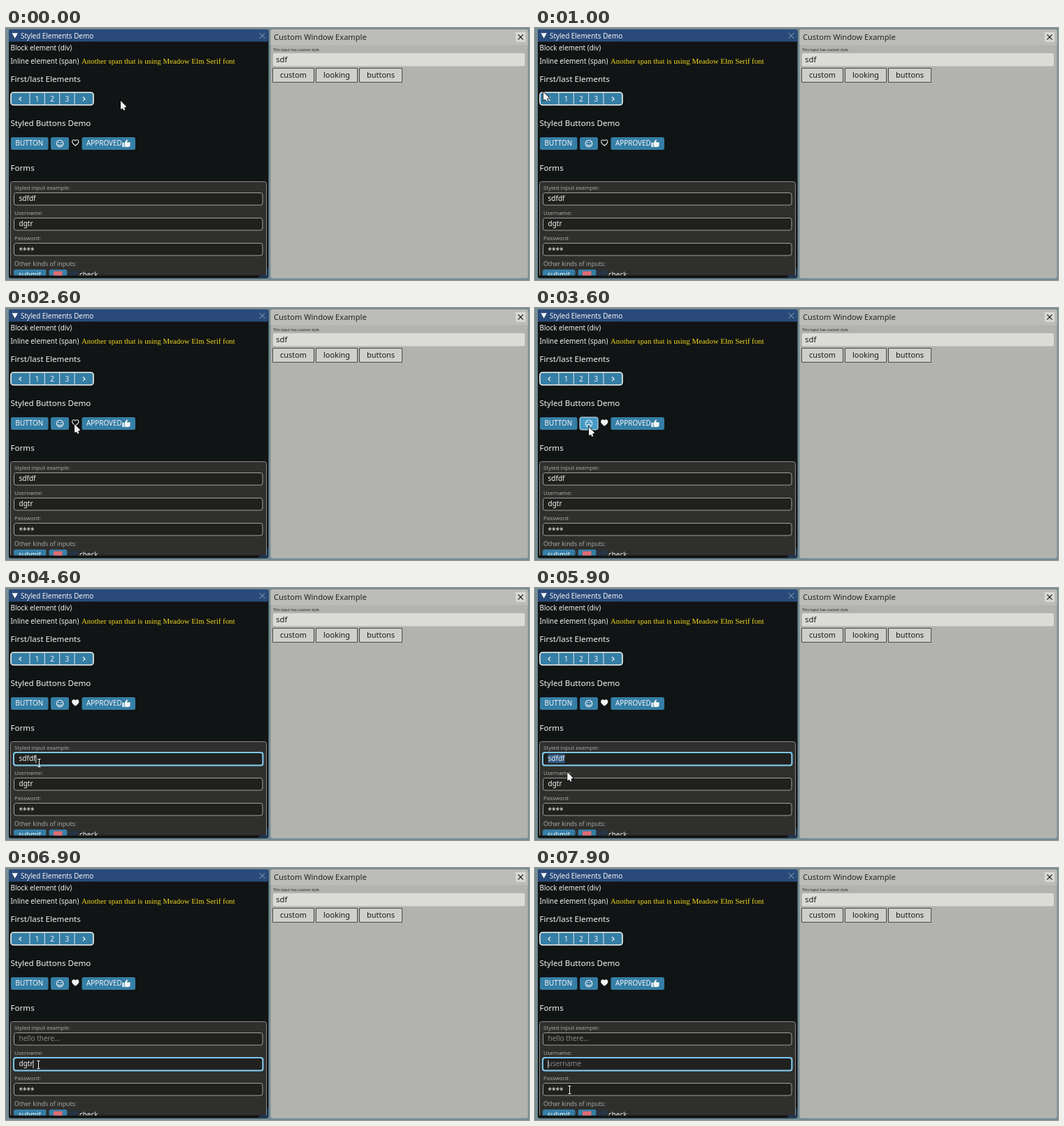
Animation, 748 px wide and 360 px high, one loop 8000 ms. Source, as an HTML page with a canvas:

```html
<!DOCTYPE html>
<html lang="en">
<head>
<meta charset="utf-8">
<title>Styled Elements Demo</title>
<style>
html, body { margin: 0; width: 100%; height: 100%; overflow: hidden; background: #738c94; }
canvas { display: block; }
</style>
</head>
<body>
<canvas id="stage" width="748" height="360"></canvas>
<script>
const ctx = document.getElementById('stage').getContext('2d');
const LOOP = 8000, STEP = 100;
const SANS = '"Noto Sans", sans-serif';
const SERIF = '"Liberation Serif", serif';
const BLUE = '#357fa6', BLUE_HOT = '#459bc4', WHITE = '#f4f4f4', INK = '#191919';

// Pointer stops: time, x, y; eased in between
const STOPS = [
  [0, 164, 104], [600, 45, 169], [1100, 8, 82], [1700, 103, 102],
  [2100, 160, 168], [2600, 98, 166], [3000, 45, 220], [3600, 77, 170],
  [3900, 30, 142], [4500, 47, 250], [5700, 47, 250], [6300, 44, 300],
  [6700, 46, 281], [7500, 46, 281], [7900, 49, 317]
];

const clamp = (v, lo, hi) => Math.min(hi, Math.max(lo, v));
const smooth = k => k * k * (3 - 2 * k);

function pointerAt(t) {
  const next = clamp(STOPS.findIndex(s => s[0] > t), 0, STOPS.length) || STOPS.length - 1;
  const [t0, x0, y0] = STOPS[next - 1], [t1, x1, y1] = STOPS[next];
  const k = smooth(clamp((t - t0) / (t1 - t0), 0, 1));
  return [x0 + (x1 - x0) * k, y0 + (y1 - y0) * k];
}

const inside = ([px, py], x, y, w, h) => px >= x && px <= x + w && py >= y && py <= y + h;

function text(str, x, y, size, color = WHITE, family = SANS, align = 'left') {
  ctx.font = `${size}px ${family}`;
  ctx.fillStyle = color;
  ctx.textAlign = align;
  ctx.fillText(str, x, y);
}

function textWidth(str, size) {
  ctx.font = `${size}px ${SANS}`;
  return ctx.measureText(str).width;
}

function paint(fill, stroke, line = 1) {
  if (fill) { ctx.fillStyle = fill; ctx.fill(); }
  if (stroke) { ctx.strokeStyle = stroke; ctx.lineWidth = line; ctx.stroke(); }
}

function box(x, y, w, h, r, fill, stroke, line) {
  ctx.beginPath();
  ctx.roundRect(x, y, w, h, r);
  paint(fill, stroke, line);
}

function polyline(points, color, line = 1) {
  ctx.beginPath();
  points.forEach(([x, y]) => ctx.lineTo(x, y));
  paint(null, color, line);
}

function triangle(a, b, c, fill) {
  ctx.beginPath();
  [a, b, c].forEach(([x, y]) => ctx.lineTo(x, y));
  ctx.closePath();
  paint(fill);
}

function cross(x, y, r, color, line) {
  for (const s of [-1, 1]) polyline([[x - r, y - r * s], [x + r, y + r * s]], color, line);
}

function chevron(x, y, dir) {
  polyline([[x - dir * 1.4, y - 2.8], [x + dir * 1.4, y], [x - dir * 1.4, y + 2.8]], WHITE, 1.2);
}

function button(mouse, x, w) {
  const hot = inside(mouse, x, 156, w, 18);
  box(x, 156, w, 18, 2.5, hot ? BLUE_HOT : BLUE, hot && '#d4e8f2');
  return hot;
}

function pager(mouse) {
  const x = 7, y = 92, w = 118, h = 18, end = 27, cell = (w - 2 * end) / 3;
  box(x, y, w, h, 4, BLUE);
  ctx.save();
  ctx.clip();
  for (let i = 0, left = x; i < 5; i++) {
    const width = i % 4 ? cell : end, mid = left + width / 2;
    if (inside(mouse, left, y, width, h)) {
      ctx.fillStyle = BLUE_HOT;
      ctx.fillRect(left, y, width, h);
    }
    if (i) polyline([[left, y], [left, y + h]], '#dfeaf0');
    if (i % 4) text(i, mid, 104.5, 10, WHITE, SANS, 'center');
    else chevron(mid, 101.3, i ? 1 : -1);
    left += width;
  }
  ctx.restore();
  box(x, y, w, h, 4, null, WHITE, 1.6);
}

function face(x, y, grimace) {
  const arc = (cx, cy, r, from, to) => { ctx.beginPath(); ctx.arc(cx, cy, r, from, to); };
  arc(x, y, 4.8, 0, 7);
  paint(null, WHITE, 1.1);
  if (grimace) arc(x, y + 3.7, 2.5, 3.5, 5.9);
  else arc(x, y + 0.4, 2.6, 0.25, 2.9);
  paint(null, WHITE, 1.1);
  for (const s of [-1, 1]) {
    if (grimace) polyline([[x + s * 2.8, y - 2.4], [x + s, y - 1.2]], WHITE);
    else { arc(x + s * 1.8, y - 1.4, 0.8, 0, 7); paint(WHITE); }
  }
}

function heart(x, y, filled) {
  ctx.beginPath();
  for (const s of [-1, 1]) {
    ctx.moveTo(x, y + 4.2);
    ctx.quadraticCurveTo(x + s * 4.6, y + 0.8, x + s * 4.6, y - 1.6);
    ctx.bezierCurveTo(x + s * 4.6, y - 4.6, x + s * 1.2, y - 4.8, x, y - 2.6);
  }
  paint(filled && WHITE, WHITE, 1.1);
}

function thumb(x, y) {
  box(x, y + 4.5, 2.4, 6.3, 0, WHITE);
  box(x + 3.3, y + 4.1, 8, 6.7, [1, 1, 3, 1], WHITE);
  polyline([[x + 4.6, y + 5], [x + 7, y + 0.8]], WHITE, 2);
}

function field(y, { label, value, hint, focus, selected }) {
  text(label, 12, y - 5, 7.9, '#a8a8a6');
  box(11.5, y, 355.5, 17.5, 3, '#20211f', '#a0a09d');
  if (focus) box(11, y - 0.5, 356.5, 18.5, 3, null, '#7bc6e8', 2);
  const width = textWidth(value, 10);
  if (selected) {
    ctx.fillStyle = 'rgba(66,130,205,.6)';
    ctx.fillRect(18.5, y + 2, width, 12.5);
  }
  const drop = value[0] === '*' ? 13 : 11.8;
  text(value || hint, 18.5, y + drop, 10, value ? WHITE : '#878785');
  if (focus && !selected) {
    polyline([[18.9 + width, y + 3], [18.9 + width, y + 14.5]], WHITE, 0.9);
  }
}

function fields(t) {
  const first = t >= 4500 && t < 6400;
  const erased = clamp(Math.ceil((t - 7250) / 125), 0, 4);
  return [
    { label: 'Styled input example:', value: t < 6100 ? 'sdfdf' : '', hint: 'hello there...',
      focus: first, selected: t >= 4800 && t < 6100 },
    { label: 'Username:', value: 'dgtr'.slice(0, 4 - erased), hint: 'username', focus: t >= 6400 },
    { label: 'Password:', value: '****' }
  ];
}

function form(t) {
  ctx.save();
  ctx.beginPath();
  ctx.rect(4, 215, 371, 138.5);
  ctx.clip();
  box(6.5, 219.5, 366, 160, 3, '#2f2f2d', '#8b8b88');
  fields(t).forEach((f, i) => field(235.5 + i * 36, f));
  text('Other kinds of inputs:', 12, 340, 8.75, '#a8a8a6');
  box(11, 345, 46.5, 18, 2.5, BLUE);
  text('submit', 18, 355.6, 9.9);
  box(61.5, 345, 26, 18, 2.5, BLUE);
  box(68, 347.5, 12.5, 12, 0, '#e36c73');
  box(90, 346.5, 13, 13, 0, '#263447');
  text('check', 105, 355.6, 9.9);
  ctx.restore();
}

function demoWindow(t, mouse) {
  box(4, 2, 371.5, 355.5, 3, '#111414');
  box(4, 2, 371.5, 17.5, [3, 3, 0, 0], '#294a7a');
  triangle([375, 342], [375, 357], [360, 357], '#1b3554');
  triangle([8.5, 7.3], [17, 7.3], [12.75, 14.8], WHITE);
  text('Styled Elements Demo', 21, 14.5, 9.9);
  cross(366.5, 11, 3.8, '#a9b7cc', 0.9);

  text('Block element (div)', 6.5, 32.3, 9.9);
  text('Inline element (span)', 6.5, 51.4, 9.9);
  text('Another span that is using Meadow Elm Serif font', 108, 51.4, 10.9, '#efd51e', SERIF);
  ['First/last Elements', 'Styled Buttons Demo', 'Forms']
    .forEach((title, i) => text(title, 6.5, 76.8 + i * 63.5, 11.6));

  pager(mouse);
  button(mouse, 7, 53.5);
  text('BUTTON', 13.5, 168.3, 9.9);
  face(77, 165, button(mouse, 64, 26));
  heart(99.3, 163.8, t >= 2800);
  button(mouse, 108.5, 76.5);
  text('APPROVED', 115, 168.3, 9.9);
  thumb(166.3, 159.2);
  form(t);
}

function customWindow() {
  box(378.5, 2, 368, 355.5, 3, '#b2b2ae');
  box(378.5, 2, 368, 22.5, [3, 3, 0, 0], '#bcbcb8');
  text('Custom Window Example', 383, 17.2, 11.1, '#252525');
  box(729, 6, 14, 14, 1, '#d8d8d4');
  cross(736, 13, 3.6, INK, 1.3);
  text('This input has custom style', 382, 32.7, 5.2, '#252525');
  box(382, 36, 360, 18.5, 2, '#dcdcd7');
  text('sdf', 386, 48.6, 11.4, INK);
  let x = 381.5;
  for (const name of ['custom', 'looking', 'buttons']) {
    const w = Math.round(textWidth(name, 10.9) + 21);
    box(x, 57.5, w, 20, 0, '#cfcfcb', '#4a4a48');
    text(name, x + w / 2, 71.4, 10.9, INK, SANS, 'center');
    x += w + 3;
  }
}

function pointer([x, y], overField) {
  ctx.save();
  ctx.translate(x, y);
  if (overField) {
    polyline([[0.5, -5.5], [0.5, 5.5]], WHITE);
    for (const end of [-5.5, 5.5]) polyline([[-1.5, end], [2.5, end]], WHITE);
  } else {
    // Dark pass first leaves an outline around the white arrow
    for (const [color, grow] of [['#0a0a0a', 1.6], [WHITE, 0]]) {
      polyline([[3, 8], [5.4, 13.2]], color, 2.2 + grow);
      triangle([0, 0], [0, 12], [8.4, 8.6], color);
      if (grow) paint(null, color, grow);
    }
  }
  ctx.restore();
}

function draw(now) {
  const t = Math.floor((now % LOOP) / STEP) * STEP;
  const mouse = pointerAt(t);
  const overField = fields(t).some((f, i) => inside(mouse, 11, 235 + i * 36, 357, 18.5));
  ctx.fillStyle = '#738c94';
  ctx.fillRect(0, 0, 748, 360);
  demoWindow(t, mouse);
  customWindow();
  pointer(mouse, overField);
}

let start;
function loop(now) {
  start ??= now;
  draw(now - start);
  requestAnimationFrame(loop);
}
requestAnimationFrame(loop);
</script>
</body>
</html>
```
